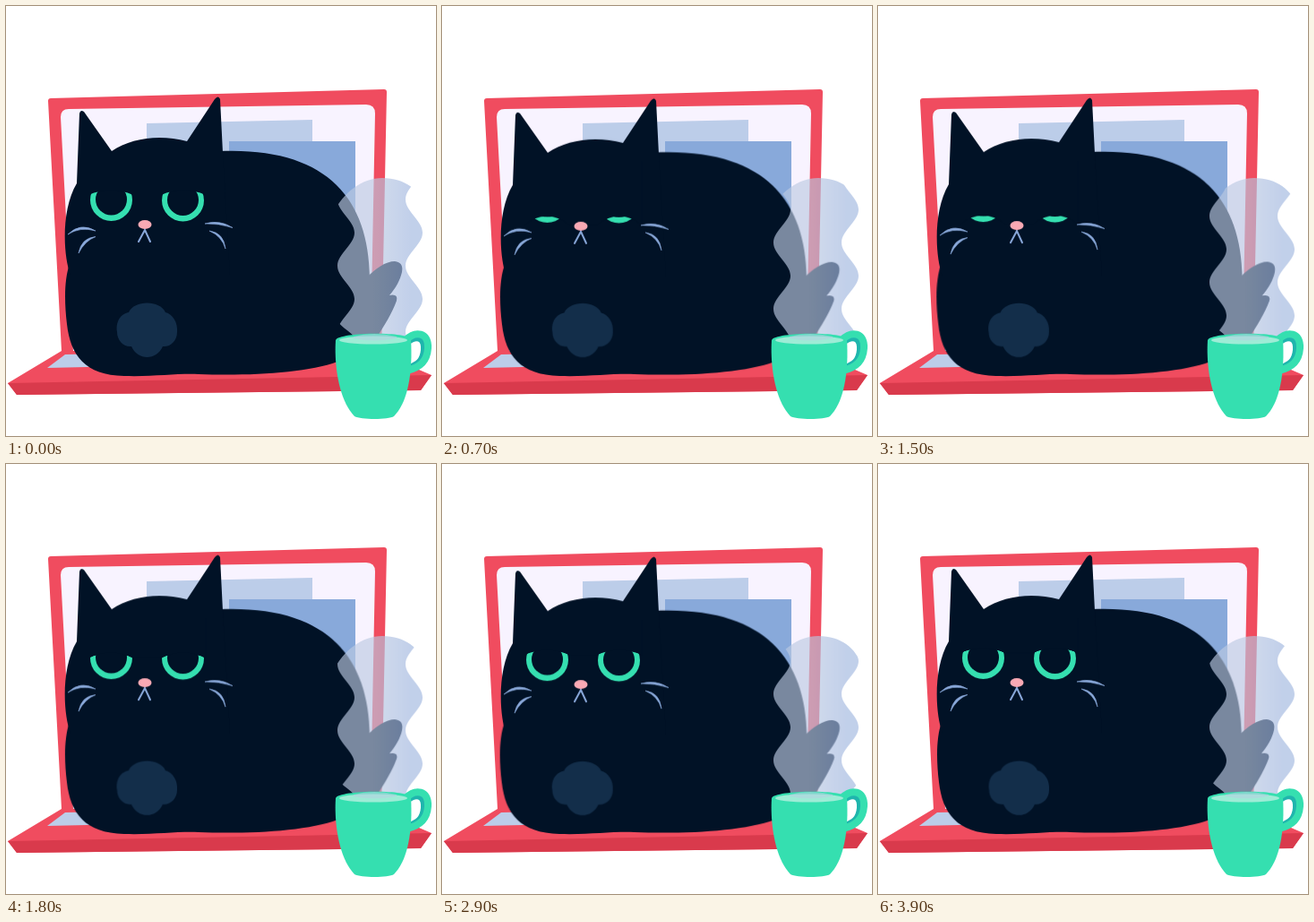
These frames come from a looping animation (480x480 px, 4000 ms). An HTML page without scripts:

```html
<!DOCTYPE html>
<html lang="en">
<head>
<meta charset="utf-8">
<title>Sleepy cat on a laptop</title>
<style>
  html, body { margin: 0; width: 100%; height: 100%; overflow: hidden; background: #fff; }
  svg { display: block; width: 100vw; height: 100vh; }

  .red { fill: #f04c5f; }
  .cat { fill: #011226; }
  .mint { fill: #35dfb0; }
  .whiskers { fill: #8aa9db; stroke: #8aa9db; stroke-width: .6; stroke-linejoin: round; }
  .mouth { fill: none; stroke: #8aa9db; stroke-width: 2; stroke-linecap: round; }

  .body { transform-origin: 236px 412px; animation: breathe 1s ease-in-out infinite alternate; }
  .head { animation: nod 1s ease-in-out infinite alternate; }
  .lid { transform-origin: 0 172px; animation: blink 4s ease-in-out infinite; }
  .wave { animation: rise 2s steps(20) infinite; }

  @keyframes breathe { to { transform: scale(1.008, .993); } }
  @keyframes nod { to { transform: translateY(2.2px); } }
  @keyframes blink {
    0%, 5% { transform: none; }
    25%, 30% { transform: scaleY(2.15); }
    50%, 100% { transform: none; }
  }
  /* one wavelength per cycle */
  @keyframes rise { to { transform: translateY(-74px); } }
</style>
</head>
<body>
<svg viewBox="0 0 480 480">
  <defs>
    <linearGradient id="vapour" gradientUnits="userSpaceOnUse" x1="408" x2="452" y1="0" y2="0">
      <stop offset="0" stop-color="#bccae2"/>
      <stop offset="1" stop-color="#a0b6df"/>
    </linearGradient>
    <clipPath id="plume">
      <path d="M366 230C376 209 397 192 420 192C446 192 462 206 468 224V345C466 360 456 364 450 371H390C386 363 368 357 366 342Z"/>
    </clipPath>
    <g id="eye">
      <circle class="mint" r="23.5"/>
      <circle class="cat" r="17.5" cy="-.5"/>
    </g>
  </defs>

  <g id="laptop">
    <path class="red" d="M50 103L422 93Q425 93 425 96L419 388L475 412L463 429L12 434L2 421L62 385L47 106Q47 103 50 103Z"/>
    <path fill="#d93a4c" d="M2 421L475 412L463 429L12 434Z"/>
    <path fill="#f8f3ff" d="M70 115L402 110Q412 110 412 120L407 378L75 385L61 124Q61 115 70 115Z"/>
    <path fill="#bccde9" d="M157 131L342 127V240H157ZM46 404L66 389L400 382V396Z"/>
    <path fill="#88a9da" d="M249 151H390V320H249Z"/>
  </g>

  <g class="body">
    <path class="cat" d="M402 304C412 293 424 285 434 285Q444 286 442 297C440 306 435 315 428 323Q438 321 436 329C431 343 422 357 414 370H385Z"/>
    <path class="cat" d="M71 288C65 305 65 330 68 355C72 390 88 412 132 413C165 414 190 410 215 411C270 413 335 410 370 397C397 388 407 340 406 303C405 212 355 157 238 162L100 200Z"/>
    <path fill="#132e4a" d="M124 364C122 350 130 343 137 342C143 328 172 328 178 342C186 344 192 353 191 364C191 374 183 381 175 380C168 396 147 396 140 380C131 381 124 373 124 364Z"/>
  </g>

  <g class="head">
    <path class="cat" d="M79 198L82 120Q83 115 87 118L118 162C140 147 172 143 202 151L233 104Q237 99 239 104L242 164L250 300H72C64 280 61 228 79 198Z"/>
    <use href="#eye" x="117.5" y="216.5"/>
    <use href="#eye" x="197.5" y="217"/>
    <path class="cat lid" d="M92 172H223V211Q198 200 173 211H142Q117 200 92 211Z"/>
    <g class="whiskers">
      <path d="M69 255Q83 241 100 251Q83 246 69 255ZM81 276Q84 259 100 257.5Q88 262 81 276Z"/>
      <path d="M222 243Q238 238 253 247.5Q238 242.5 222 243ZM227 251Q243 253 245 271Q241 257 227 251Z"/>
    </g>
    <path class="mouth" d="M148 263L155 250L161 263"/>
    <ellipse cx="155" cy="244" rx="7.5" ry="5" fill="#f9a9b4"/>
  </g>

  <g clip-path="url(#plume)" opacity=".65">
    <path class="wave" fill="url(#vapour)" d="M389 179
      c0 13.5-19 23.5-19 37s19 23.5 19 37 s-19 23.5-19 37s19 23.5 19 37
      s-19 23.5-19 37s19 23.5 19 37 s-19 23.5-19 37s19 23.5 19 37 H465
      c0-13.5-19-23.5-19-37s19-23.5 19-37 s-19-23.5-19-37s19-23.5 19-37
      s-19-23.5-19-37s19-23.5 19-37 s-19-23.5-19-37s19-23.5 19-37Z"/>
  </g>

  <g id="mug">
    <path fill="none" stroke="#1fb5ad" stroke-width="6" d="M448 376C458 368 467 370 466 384C465 396 459 400 450 403"/>
    <path fill="none" stroke="#35dfb0" stroke-width="8" d="M446 373C457 362 472 364 471 382C470 396 463 403 448 407"/>
    <path class="mint" d="M368 373C370 364 450 363 452 372C454 405 450 441 433 458C427 462 396 462 389 458C373 442 366 405 368 373Z"/>
    <ellipse cx="410" cy="373" rx="38" ry="4.5" fill="#9eecd6"/>
    <path fill="#b4d3e2" d="M388 369Q410 363 436 369V371Q410 376 388 371Z" opacity=".6"/>
  </g>
</svg>
</body>
</html>
```
